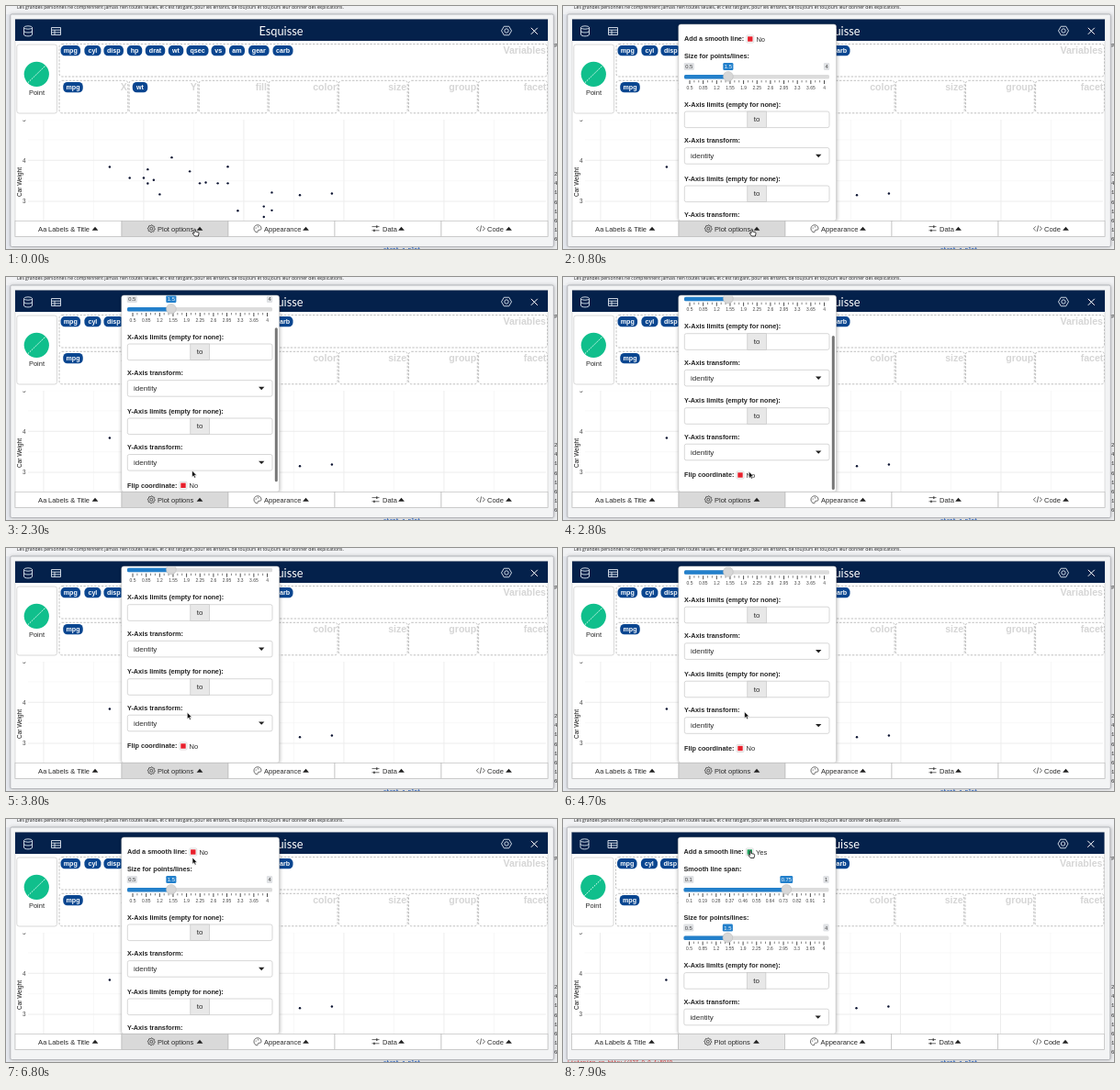
Recreate the animation shown at these times as an HTML page. Size 600 by 265 pixels, loop 8000 ms.

```html
<!DOCTYPE html>
<html lang="en">
<head>
<meta charset="utf-8">
<title>Plot builder</title>
<style>
html, body { margin: 0; width: 100%; height: 100%; overflow: hidden; background: #f1f2f4; }
svg { display: block; width: 100vw; height: 100vh; }
text { font-family: "Liberation Sans", Arial, sans-serif; font-size: 7.5px; fill: #2a2a2a; }
.label { font-weight: 700; font-size: 7.25px; fill: #222; }
.chip { font-weight: 700; font-size: 7.1px; fill: #fff; }
.zone { font-weight: 700; font-size: 10.6px; fill: #d6d6d6; }
.tag { font-size: 5.8px; }
.tick { font-size: 4.9px; fill: #444; }
.field { font-size: 8px; fill: #2c2c2c; }
.axis { font-size: 6.4px; fill: #444; }
.back { font-family: "Liberation Mono", monospace; font-size: 5.6px; }
</style>
</head>
<body>
<svg id="stage" viewBox="0 0 600 265">
  <defs>
    <clipPath id="plotClip"><rect x="10" y="124" width="580" height="110"/></clipPath>
    <clipPath id="menuClip"><rect x="126" y="20.5" width="171" height="213.5"/></clipPath>
    <filter id="soft" x="-10%" y="-10%" width="120%" height="120%"><feGaussianBlur stdDeviation="2"/></filter>
  </defs>
  <g id="desk"></g>
  <g id="app">
    <g id="base"></g>
    <g id="menu">
      <rect x="126" y="21" width="172" height="214" rx="3" fill="#000" opacity=".32" filter="url(#soft)"/>
      <rect x="125.8" y="20" width="171.7" height="214.3" rx="2.5" fill="#fff" stroke="#c4c4c4" stroke-width=".5"/>
      <g clip-path="url(#menuClip)"><g id="scroller"></g></g>
      <rect id="thumb" x="292.8" width="3" height="168" rx="1.5" fill="#777"/>
    </g>
    <g id="bar"></g>
  </g>
  <g id="cursor">
    <path id="arrow" d="M0 0V7.2L1.7 5.7L2.8 8.2L4.1 7.6L3 5.2H5.2Z" fill="#111" stroke="#fff" stroke-width=".6"/>
    <path id="hand" d="M0 .6Q.7-.3 1.3.6V3L4.6 3.8Q5.2 4 5 5L4.4 8H.6L-1.8 4.9Q-1.6 3.9-.6 4.5L0 5Z" fill="#fff" stroke="#111" stroke-width=".8"/>
  </g>
</svg>
<script>
const NAVY = '#04214b', BLUE = '#0a4690', LINK = '#2380cb';
const $ = id => document.getElementById(id);

const rect = (x, y, w, h, fill, more = '') =>
  `<rect x="${x}" y="${y}" width="${w}" height="${h}" fill="${fill}" ${more}/>`;
const text = (x, y, s, cls = '', anchor = 'start', more = '') =>
  `<text x="${x}" y="${y}" class="${cls}" text-anchor="${anchor}" ${more}>${s}</text>`;
const path = (d, stroke, width = 1, fill = 'none', more = '') =>
  `<path d="${d}" fill="${fill}" stroke="${stroke}" stroke-width="${width}" ${more}/>`;
const circle = (x, y, r, fill, more = '') =>
  `<circle cx="${x}" cy="${y}" r="${r}" fill="${fill}" ${more}/>`;

// A closed ring of points; radius(i) gives each point's distance.
function ring(x, y, n, radius, color) {
  let d = '';
  for (let i = 0; i < n; i++) {
    const a = i * 2 * Math.PI / n, r = radius(i);
    d += `${i ? 'L' : 'M'}${(x + r * Math.cos(a)).toFixed(2)} ${(y + r * Math.sin(a)).toFixed(2)}`;
  }
  return path(d + 'Z', color, .9, 'none', 'stroke-linejoin="round"');
}
const hub = (x, y, r, color) => circle(x, y, r, 'none', `stroke="${color}" stroke-width=".9"`);

function drawDesk() {
  let s = rect(0, 0, 600, 265, '#f1f2f4') + rect(0, 9, 5, 256, '#e6e9ef');
  s += text(12, 3, "Les grandes personnes ne comprennent jamais rien toutes seules, et c'est fatigant, " +
    "pour les enfants, de toujours et toujours leur donner des explications.", '', 'start',
    'style="font:5px \'Open Sans\',sans-serif;fill:#222"');
  s += rect(5, 9, 592, 254, '#777', 'opacity=".5" filter="url(#soft)"');
  s += text(594, 45, 'TP', 'back');
  [...'24161616'].forEach((c, i) => s += text(597, 185 + i * 10.2, c, 'back'));
  s += `<g id="log">${text(5, 267, 'Listening on http://127.0.0.1:5019', 'back', 'start', 'style="fill:#c22"')}</g>`;
  s += text(411, 266.6, 'start_a_plot', 'back', 'start', 'style="fill:#1d57b5;font-weight:700"');
  $('desk').innerHTML = s;
}

const chip = (cx, cy, name, w) =>
  rect(cx - w / 2, cy - 5.6, w, 11.2, BLUE, 'rx="4.5"') + text(cx, cy + 2.2, name, 'chip', 'middle');
const dashed = (x, y, w, h) =>
  rect(x, y, w, h, 'none', 'rx="3" stroke="#b9b9b9" stroke-width=".9" stroke-dasharray="2.4 1.5"');

function header() {
  const c = '#dfe6f0';
  let s = rect(10, 14.5, 580, 23.5, NAVY);
  s += path('M19.5 23.5V31C19.5 33.5 28.5 33.5 28.5 31V23.5M19.5 27.2C19.5 29.5 28.5 29.5 28.5 27.2', c, .9);
  s += `<ellipse cx="24" cy="23.5" rx="4.5" ry="1.7" fill="none" stroke="${c}" stroke-width=".9"/>`;
  s += path('M49.5 23.5H59.5V31.5H49.5ZM49.5 26.2H59.5M49.5 28.9H59.5M53 26V31.5', c, .9);
  s += text(299.5, 31.5, 'Esquisse', '', 'middle', 'style="font:400 12.8px Lato,sans-serif;fill:#fff"');
  s += ring(545, 27, 6, () => 5.5, c) + hub(545, 27, 2.2, c);
  return s + path('M571.8 23.8L578.8 30.8M578.8 23.8L571.8 30.8', '#fff', 1);
}

function zones() {
  let s = rect(11.8, 42, 43.7, 75, '#fff', 'rx="2.5" stroke="#cfcfcf" stroke-width=".8"');
  s += circle(33.3, 74.3, 13.6, '#10bf8c') + path('M24 83.5L43 65', '#e9fff7', 1, 'none', 'stroke-dasharray="1.7 1.2"');
  s += text(33.5, 97.3, 'Point', '', 'middle');
  s += dashed(58, 41.5, 531.5, 35.5) + text(588, 52.3, 'Variables', 'zone', 'end');
  const names = 'mpg cyl disp hp drat wt qsec vs am gear carb'.split(' ');
  const mids = [70.3, 94.4, 117.2, 140, 162.5, 185, 208.5, 231.3, 251.5, 275.3, 301.5];
  const wide = [21.5, 18, 21.5, 16.5, 21.5, 16.5, 24, 15.5, 17, 22.5, 22];
  names.forEach((n, i) => s += chip(mids[i], 48.7, n, wide[i]));
  ['X', 'Y', 'fill', 'color', 'size', 'group', 'facet'].forEach((n, i) => {
    const x = 58 + i * 76.1;
    s += dashed(x, 81.3, 74.8, 35.5) + text(x + 73.8, 92.2, n, 'zone', 'end');
  });
  return s + chip(73, 88.6, 'mpg', 21.5) + chip(146, 88.6, 'wt', 16.5);
}

const CARS = [[21, 2.62], [21, 2.875], [21.4, 3.215], [18.7, 3.44], [18.1, 3.46], [14.3, 3.57],
  [24.4, 3.19], [22.8, 3.15], [19.2, 3.44], [17.8, 3.44], [16.4, 4.07], [17.3, 3.73], [15.2, 3.78],
  [15.5, 3.52], [15.2, 3.435], [13.3, 3.84], [19.2, 3.845], [15.8, 3.17], [19.7, 2.77], [15, 3.57], [21.4, 2.78]];

function plot() {
  const px = mpg => 320 + (mpg - 22.8) * 21.8, py = wt => 213 - (wt - 3) * 44.7;
  let s = '';
  for (let i = 0; i < 10; i++) {
    const x = px(10 + i * 2.5);
    s += path(`M${x} 124V234`, i % 2 ? '#f4f4f4' : '#ebebeb', i % 2 ? .6 : .9);
  }
  for (let w = 2.5; w <= 5; w += .5)
    s += path(`M24 ${py(w)}H588`, w % 1 ? '#f4f4f4' : '#ebebeb', w % 1 ? .6 : .9);
  for (const w of [3, 4, 5]) s += text(21.5, py(w) + 2.2, w, 'axis', 'end');
  for (const [m, w] of CARS) s += circle(px(m), py(w), 1.2, '#0a1230');
  s += text(0, 0, 'Car Weight', 'axis', 'middle', 'transform="translate(17.3 192)rotate(-90)" style="fill:#111"');
  return `<g clip-path="url(#plotClip)">${s}</g>`;
}

function drawBase() {
  $('base').innerHTML = rect(4.8, 9, 591.5, 253.5, '#f3f4f5', 'rx="1.5" stroke="#a9abb0" stroke-width=".8"') +
    rect(10, 14.5, 580, 237, '#fff', 'stroke="#c9c9c9" stroke-width=".6"') + header() + zones() + plot();
}

function drawBar() {
  const items = [['Labels &amp; Title', 46, 97], ['Plot options', 165, 211], ['Appearance', 281, 326.5],
    ['Data', 410, 430.5], ['Code', 524, 547.5]];
  let s = '';
  items.forEach(([name, x, cx], i) => {
    s += rect(10 + i * 116, 234.3, 116, 17.2, i === 1 ? '#d9d9d9' : '#fff',
      `${i === 1 ? 'id="active"' : ''} stroke="#bdbdbd" stroke-width=".7"`);
    s += text(x, 245.6, name) + path(`M${cx - 3.4} 244.8L${cx} 240.8L${cx + 3.4} 244.8Z`, 'none', 0, '#222');
  });
  s += text(35, 245.6, 'A') + text(40.3, 245.6, 'a');
  s += ring(158.3, 242.8, 32, i => i % 4 < 2 ? 4 : 3.2, '#444') + hub(158.3, 242.8, 1.5, '#444');
  s += path('M274 238.8C268.5 239 269 246.5 273.4 246.8C275 246.8 273.5 244.6 275 244.3C276.5 244 278.3 244.6 278 242.2C277.7 240 276 238.8 274 238.8Z', '#444', .8);
  s += circle(272.2, 242, .6, '#444') + circle(274.5, 240.8, .6, '#444');
  s += path('M398.5 240.6H406.5M398.5 244.8H406.5', '#444', .8) + rect(403, 239.4, 1.5, 2.4, '#444') + rect(400.2, 243.6, 1.5, 2.4, '#444');
  s += path('M514.8 240.4L512.3 242.8L514.8 245.2M519 240.4L521.5 242.8L519 245.2M517.7 239.4L516.1 246.2', '#444', .8);
  $('bar').innerHTML = s;
}

function toggle(x, y, on) {
  return rect(x - 4, y - 4, 8, 8, '#fff', 'rx="1" stroke="#cfcfcf" stroke-width=".7"') +
    rect(x - 2.7, y - 2.7, 5.4, 5.4, on ? '#1f9d5b' : '#e8202c') +
    text(x + 6.6, y + 2.7, on ? 'Yes' : 'No');
}

function slider(y, title, min, max, value) {
  const at = v => 138 + (v - min) / (max - min) * 146.5, x = at(value);
  const tag = (cx, v, bg, fg) => {
    const w = String(v).length * 2.7 + (v % 1 ? 3 : 3.6);
    return rect(cx - w / 2, y - 15, w, 8, bg, 'rx="1.3"') +
      text(cx, y - 8.9, v, 'tag', 'middle', `style="fill:${fg}"`);
  };
  let s = text(132, y - 20, title, 'label');
  s += tag(137.3, min, '#dfe1e4', '#444') + tag(287, max, '#dfe1e4', '#444') + tag(x, value, LINK, '#fff');
  s += rect(132, y - 2, 158, 4.5, '#dcdcdc', 'rx="1.5"') + rect(132, y - 2, x - 132, 4.5, LINK, 'rx="1.5"');
  for (let i = 0; i <= 30; i++) {
    const tx = 138 + i * 146.5 / 30, big = i % 3 === 0;
    s += path(`M${tx} ${y + 4}v${big ? 4 : 2.4}`, big ? '#222' : '#555', big ? .8 : .7);
    if (big) s += text(tx, y + 13.8, +(min + (max - min) * i / 30).toFixed(2), 'tick', 'middle');
  }
  return s + circle(x, y - .2, 5.4, '#d7d7d7', 'stroke="#b4b4b4" stroke-width=".5"');
}

function limits(y, axis) {
  const edge = 'stroke="#c6c6c6" stroke-width=".7"';
  return text(132, y + 2.5, axis + '-Axis limits (empty for none):', 'label') +
    rect(132.3, y + 8, 157.7, 17.6, '#fff', 'rx="2" ' + edge) +
    rect(200.8, y + 8, 20.6, 17.6, '#e8e8e8', edge) + text(211.2, y + 19.4, 'to', 'field', 'middle');
}

function transform(y, axis) {
  return text(132, y + 2.5, axis + '-Axis transform:', 'label') +
    rect(132.3, y + 7.8, 157.7, 17.6, '#fff', 'rx="2" stroke="#c6c6c6" stroke-width=".7"') +
    text(139, y + 19.2, 'identity', 'field') + path(`M275 ${y + 15}h6.4l-3.2 3.4Z`, 'none', 0, '#222');
}

function drawMenu() {
  $('scroller').innerHTML = text(132, 38.4, 'Add a smooth line:', 'label') +
    `<g id="off">${toggle(203.8, 36, false)}</g>` +
    `<g id="on">${toggle(203.8, 36, true)}${slider(77, 'Smooth line span:', .1, 1, .75)}</g>` +
    `<g id="rest">${slider(77, 'Size for points/lines:', .5, 4, 1.5)}
    ${limits(107, 'X')}${transform(146.8, 'X')}${limits(188, 'Y')}${transform(227.7, 'Y')}
    ${text(132, 271.8, 'Flip coordinate:', 'label')}${toggle(193, 269.3, false)}</g>`;
}

// Each track is a list of [time, ...values], joined linearly.
const CURSOR = [[0, 205, 243], [1500, 205, 243], [1900, 202.5, 211], [2700, 202.5, 211], [2800, 202.3, 212],
  [3200, 195, 206], [3600, 197, 180], [3700, 197, 180], [3900, 197.6, 178.5], [5200, 197.6, 178.5],
  [5600, 199.2, 121.8], [6100, 184.2, 74], [6500, 184.2, 74], [6800, 203, 42], [7200, 203.6, 34.5]];
const SCROLL = [[2100, 0], [2200, 14], [2300, 42], [2400, 53.3], [4600, 53.3], [4700, 50.8], [4800, 30], [4900, 9], [5000, 0]];
const SHOW = [[100, 0], [200, .35], [400, 1]];
const THUMB = [[2100, 0], [2200, 1], [2900, 1], [3200, 0], [4700, 0], [4800, 1], [5200, 1], [5500, 0]];

function sample(track, t) {
  if (t <= track[0][0]) return track[0].slice(1);
  for (let i = 1; i < track.length; i++) {
    const a = track[i - 1], b = track[i];
    if (t <= b[0]) return b.slice(1).map((v, k) => a[k + 1] + (v - a[k + 1]) * (t - a[0]) / (b[0] - a[0]));
  }
  return track[track.length - 1].slice(1);
}

const set = (id, name, value) => $(id).setAttribute(name, value);
const show = (id, yes) => set(id, 'visibility', yes ? 'visible' : 'hidden');

function render(time) {
  const t = Math.floor(time % 8000 / 100) * 100;
  const [x, y] = sample(CURSOR, t), [scroll] = sample(SCROLL, t);
  const smooth = t >= 7600, hand = t < 1600 || t >= 7200;
  set('cursor', 'transform', `translate(${x} ${y})`);
  show('hand', hand);
  show('arrow', !hand);
  set('menu', 'opacity', sample(SHOW, t)[0]);
  set('scroller', 'transform', `translate(0 ${-scroll})`);
  set('thumb', 'y', 22 + scroll * .79);
  set('thumb', 'opacity', sample(THUMB, t)[0]);
  show('on', smooth);
  show('off', !smooth);
  show('log', smooth);
  set('rest', 'transform', `translate(0 ${smooth ? 52.6 : 0})`);
  set('app', 'transform', `translate(${smooth ? -.5 : 0} 0)`);
  set('active', 'fill', t >= 7400 ? '#e8e8e8' : '#d9d9d9');
}

drawDesk();
drawBase();
drawBar();
drawMenu();
const start = performance.now();
function loop() {
  render(performance.now() - start);
  requestAnimationFrame(loop);
}
loop();
</script>
</body>
</html>
```
